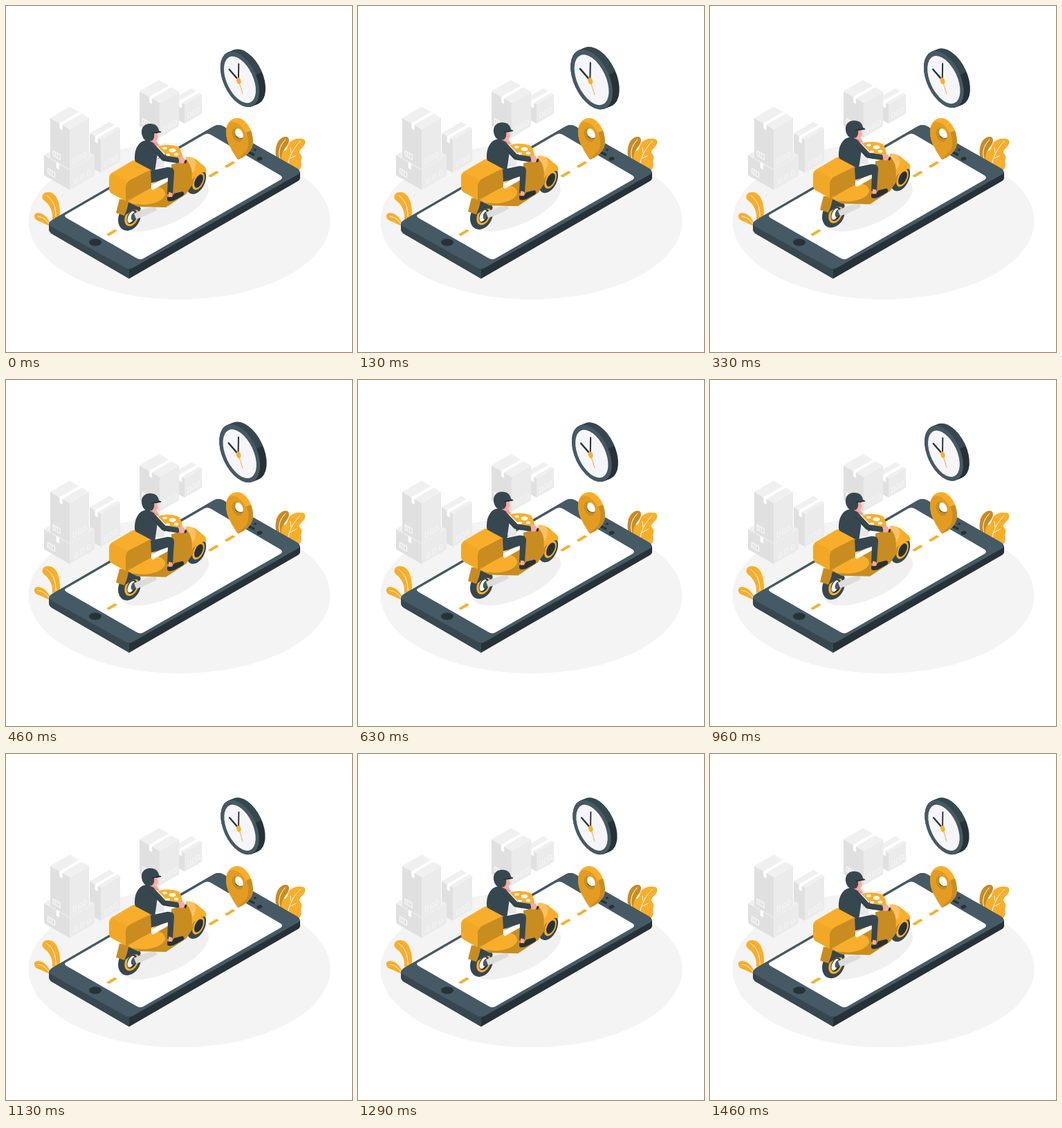
These frames come from a looping animation (500x500 px, 1.5 s). An HTML page with a canvas:

```html
<!DOCTYPE html>
<html lang="en">
<head>
<meta charset="utf-8">
<title>Scooter delivery</title>
<style>
html, body { margin: 0; width: 100%; height: 100%; overflow: hidden; background: #fff; }
canvas { display: block; width: 100vmin; height: 100vmin; }
</style>
</head>
<body>
<canvas id="stage"></canvas>
<script>
const LOOP = 1500;
const ORANGE = '#f9ae2b', GOLD = '#c98c20', AMBER = '#e39c22';
const SLATE = '#455a64', STEEL = '#37474f', NIGHT = '#263238', SKIN = '#ffa8a0';

const canvas = document.getElementById('stage');
const ctx = canvas.getContext('2d');

const fill = (path, color) => {
  ctx.fillStyle = color;
  ctx.fill(new Path2D(path));
};

const line = (path, color, width = 1) => {
  ctx.strokeStyle = color;
  ctx.lineWidth = width;
  ctx.lineCap = ctx.lineJoin = 'round';
  ctx.stroke(new Path2D(path));
};

const oval = (x, y, rx, ry, color, tilt = 0) => {
  ctx.fillStyle = color;
  ctx.beginPath();
  ctx.ellipse(x, y, rx, ry, tilt * Math.PI / 180, 0, Math.PI * 2);
  ctx.fill();
};

const mix = (a, b, k) => a + (b - a) * k;

// Piecewise linear value through [time, value] points.
function track(points, t) {
  const i = Math.max(1, points.findIndex(p => p[0] >= t));
  const [t0, a] = points[i - 1], [t1, b] = points[i];
  return mix(a, b, (t - t0) / (t1 - t0));
}

// Isometric carton: x, y is its near top corner; l and r are the face widths.
function carton(x, y, l, r, h, label = true) {
  const ly = l * 0.58, ry = r * 0.58;
  fill(`M${x} ${y}l${-l} ${-ly}v${h}l${l} ${ly}z`, '#e0e0e0');
  fill(`M${x} ${y}l${r} ${-ry}v${h}l${-r} ${ry}z`, '#ebebeb');
  fill(`M${x} ${y}l${-l} ${-ly}l${r} ${-ry}l${l} ${ly}z`, '#f0f0f0');
  const tx = x - l * 0.52, ty = y - ly * 0.52;
  fill(`M${tx} ${ty}l${r} ${-ry}l4 2.3l${-r} ${ry}v8l-4 -2.3z`, '#fff');
  if (label) {
    const bx = x - l * 0.85, by = y - ly * 0.85 + h - 13;
    line(`M${bx} ${by}l10 5.8v7l-10 -5.8zM${bx + 3} ${by + 3}v4M${bx + 6} ${by + 5}v3`, '#fafafa', 1.2);
  }
  for (const k of [0.2, 0.46, 0.72]) {
    const ax = x + r * k, ay = y - ry * k + h - 5;
    line(`M${ax} ${ay}v-7l2 -1l2 0v5z`, '#f6f6f6', 1);
  }
}

function drawCartons() {
  carton(258, 142, 15, 25, 28, false);
  carton(222, 140, 29, 28, 50);
  carton(137, 193, 16, 28, 48, false);
  carton(92, 237, 37, 36, 29);
  carton(92, 178, 28, 28, 58);
}

function drawPlants() {
  fill('M78 305C79 285 73 269 61 269C52 269 50 277 55 281C63 287 68 296 67 308Z', ORANGE);
  line('M59 274C68 280 72 290 72 304', '#fff');
  fill('M65 319C63 307 54 298 45 299C39 300 40 307 45 310C52 312 57 316 64 318Z', ORANGE);
  line('M46 304C54 305 59 310 62 315', '#fff');
  fill('M391 222C387 206 392 191 403 189C411 188 410 197 406 202C400 209 398 215 401 225Z', GOLD);
  line('M404 193C395 202 393 211 396 221', '#fff');
  fill('M399 228C397 218 398 210 403 209C407 208 406 203 410 197C416 191 428 190 432 194C435 201 426 205 424 210C423 214 429 215 427 221C425 226 429 231 424 237Z', ORANGE);
  line('M425 196C415 206 409 217 407 232M412 212L411 205M409 221L419 216', '#fff');
}

function drawPhone() {
  fill('M62 317Q62 312 67 309L300 174Q307 170 314 174L421 235Q425 238 425 242V249Q425 251 422 253L178 394L66 329Q62 326 62 322Z', NIGHT);
  fill('M62 315L178 380V394L66 329Q62 326 62 322Z', STEEL);
  fill('M62 316Q62 312 67 309L300 174Q307 170 314 174L421 235Q428 240 421 244L184 378Q178 382 172 378L66 319Z', SLATE);
  fill('M87 301L286 186Q291 183 296 186L397 245Q401 248 397 251L200 364Q194 368 188 364L87 306Q83 303 87 301Z', '#fff');
  oval(129, 341.5, 9, 5.2, NIGHT);
  oval(366.5, 220.8, 4, 2.6, NIGHT, -12);
  line('M350 211L358 215', NIGHT, 3.4);
  oval(360, 208, 2, 1.4, NIGHT);
}

function drawRoad() {
  for (const [x, y] of [[145, 330], [292, 245.5], [315.5, 231.5]])
    fill(`M${x} ${y}l12 -7.2l4 2l-12 7.4z`, ORANGE);
  oval(229, 288, 69, 28, '#f0f0f0', -24);
}

function drawPin() {
  fill('M335 222C324 205 318 195 318 182C318 168 327 160 338 162.5C349 166 357 182 357 196C357 209 347 217 335 222Z', ORANGE);
  fill('M335 222C324 205 318 195 318 182C318 170 324 166 331 168C343 172 350 187 350 199C350 210 342 215 335 222Z', AMBER);
  fill('M335 222C341 214 350 211 350 199C350 193 349 188 347 183L354 180C359 195 358 206 348 214C344 218 340 220 335 222Z', GOLD);
  oval(334.5, 186, 7.2, 10.5, GOLD, -25);
  oval(337, 184.5, 5, 8, '#fff', -27);
  line('M332 188C335 191 338 192 341.5 191', NIGHT, 1);
}

function drawClock(scale) {
  const cx = 342.5, cy = 104;
  ctx.save();
  ctx.translate(cx, cy);
  ctx.scale(scale, scale);
  ctx.translate(-cx, -cy);
  const edge = ctx.createLinearGradient(366, 92, 370, 100);
  edge.addColorStop(0.48, STEEL);
  edge.addColorStop(0.52, NIGHT);
  for (let i = 12; i >= 0; i--)
    oval(338 + i * 0.74, 106 - i * 0.3, 42, 23.5, edge, 65);
  oval(338, 106, 42, 23.5, SLATE, 65);
  oval(338, 106.5, 35.5, 18.8, '#f6f5fa', 65);
  line('M336 107L323 92', NIGHT, 2.3);
  line('M336 107L336.4 84', NIGHT, 1.9);
  line('M336 107L342 126', ORANGE, 1);
  oval(336.4, 108, 3, 4.6, ORANGE, -18);
  ctx.restore();
}

function drawWheel(x, y, rx, ry) {
  oval(x, y, rx, ry, STEEL, 25);
  oval(x + 3, y, rx * 0.6, ry * 0.68, ORANGE, 25);
  oval(x + 3.5, y, rx * 0.42, ry * 0.52, NIGHT, 25);
}

function drawScooter() {
  drawWheel(275, 253, 12.5, 20);
  drawWheel(178.5, 305, 15.5, 20.5);
  oval(181, 305, 4.5, 9, '#fff', 25);
  oval(184.5, 304, 3.5, 6, SLATE, 20);

  fill('M164 279L159 299L171 303L178 286L195 290L198 283Z', GOLD);
  fill('M177 284L192 286L195 294L183 295L173 302Z', STEEL);
  fill('M185 300C196 294 206 291 216 290L218 295C208 300 198 305 188 308Z', '#dcdcdc');

  fill('M174 282L210 258L240 238L268 226L271 256L260 272L231 291L190 290Z', GOLD);
  fill('M176 282L209 262C219 259 229 263 230 271C230 280 214 287 198 287L183 286Z', ORANGE);
  fill('M207 260L233 247L235 253L212 266Z', '#fff');
  fill('M213 223L228 218L229 233L214 234Z', '#e8e8e8');

  fill('M262 222C270 214 278 225 285 230Q291 235 289 240C281 239 273 245 269 252Z', ORANGE);
  fill('M260 218C270 216 276 224 274 232C272 239 269 242 265 244L258 231Z', '#fdc163');
  fill('M239 229L261 223C270 232 270 246 267 257L258 271L239 278Z', GOLD);

  fill('M219 203Q235 198 250 204Q255 212 255 221L238 222Z', ORANGE);
  oval(240.5, 208.5, 4.8, 2.8, '#fff');
  oval(229.5, 205.5, 3.3, 1.9, '#fff');
  oval(246, 214.3, 3.3, 2, '#fff');
  oval(234, 215, 3, 1.8, '#fff');

  fill('M149 248Q149 244 153 241L182 224Q186 222 190 224L210 236L175 255L173 282L153 271Q149 268 149 264Z', ORANGE);
  fill('M149 248L154 242L175 253L173 282L153 271Q149 268 149 264Z', '#f2a727');
  fill('M173 282V261Q174 254 180 251L210 236V263Z', GOLD);
}

function drawRider() {
  fill('M205 193L217 194L222 202L210 203Z', SKIN);
  fill('M211 180L218 184L220 190L217 195L208 197Z', SKIN);
  fill('M186 222C185 204 194 194 204 194L214 198L219 212L215 240L187 225Z', STEEL);

  fill('M209 238L233 233Q243 232 243 240L241 271L233 272L234 248L210 256Z', STEEL);
  fill('M235 269L240 270L240 277L235 277Z', SKIN);
  fill('M233 276L240 276L243 271L255 268Q259 270 256 274L243 281Q234 284 233 280Z', NIGHT);

  line('M213 204L228 220L247 223', STEEL, 8);
  line('M210 205L225 220L236 225', NIGHT, 0.8);
  fill('M249 219Q257 216 259 223Q257 229 251 227Z', SKIN);
  oval(259.5, 225, 1.6, 2.8, NIGHT, 20);

  fill('M196 184C195 175 201 170 208 170C216 170 220 174 221 180L224 182L218 184L214 184C215 190 213 195 208 196C201 196 197 191 196 184Z', STEEL);
  line('M211 184L223.5 182', NIGHT, 1.6);
  line('M209 195L219 201', '#e98880', 1.2);
}

const pulse = [[0, 1.015], [125, 1.1], [330, 1.042], [390, 1.03], [515, 1.092],
  [630, 1.043], [830, 1.018], [1085, 1], [1480, 1], [LOOP, 1.015]];

function draw(now) {
  const t = now % LOOP;
  const size = Math.round(canvas.clientWidth * (window.devicePixelRatio || 1));
  if (canvas.width !== size) canvas.width = canvas.height = size;
  ctx.setTransform(size / 500, 0, 0, size / 500, 0, 0);
  ctx.fillStyle = '#fff';
  ctx.fillRect(0, 0, 500, 500);

  oval(250.5, 311, 218, 113, '#f4f4f4');
  drawCartons();
  drawPlants();
  drawPhone();
  drawRoad();
  drawPin();
  drawClock(track(pulse, t));

  const lift = 10 * (1 - Math.abs(1 - 2 * t / LOOP));
  ctx.save();
  ctx.translate(0, -lift);
  drawScooter();
  drawRider();
  ctx.restore();
}

const start = performance.now();
function tick() {
  draw(performance.now() - start);
  requestAnimationFrame(tick);
}
tick();
</script>
</body>
</html>
```
